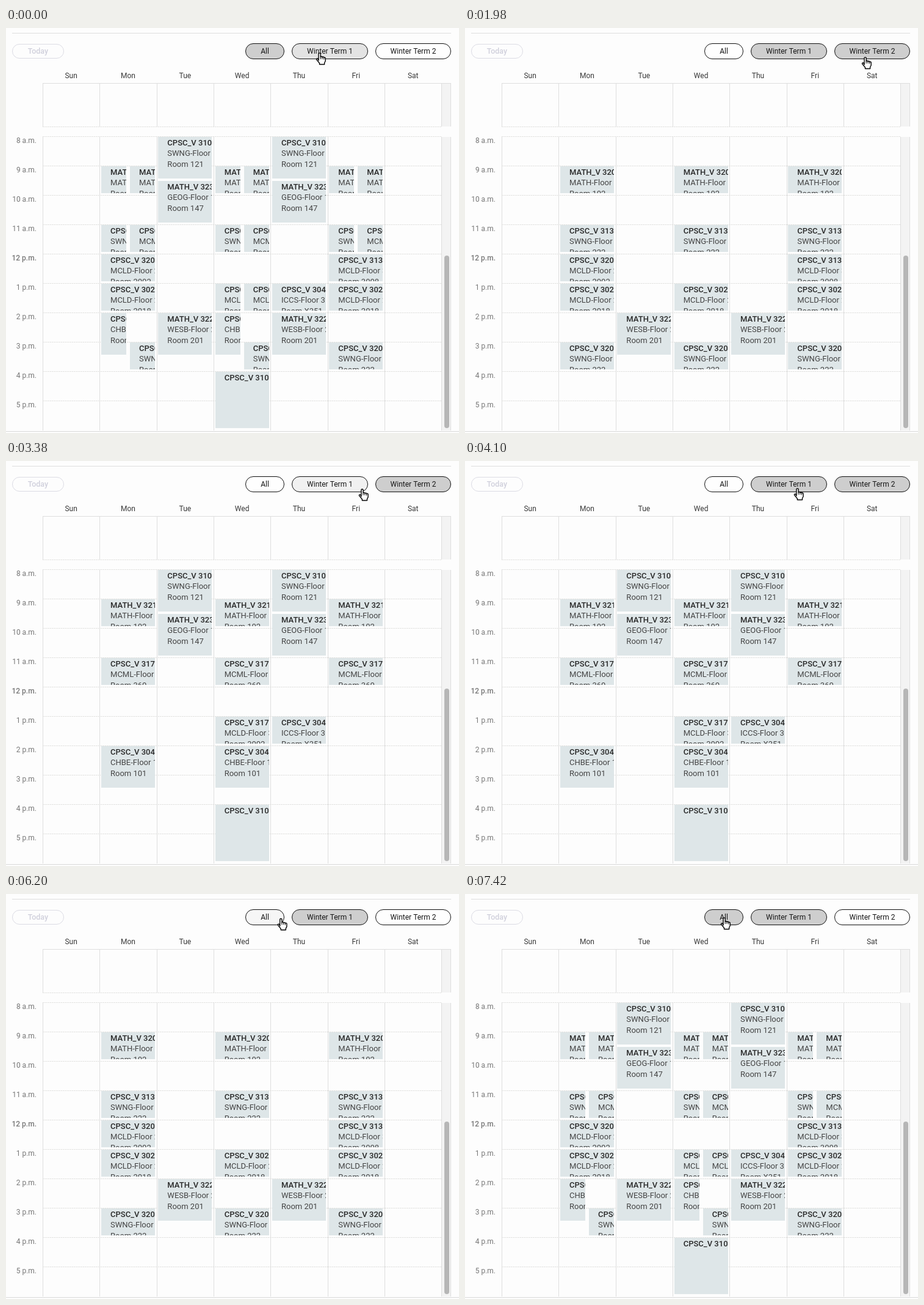
Animation of 742 by 662 pixels, one loop 7520 ms. Source, as an HTML page with a canvas:

```html
<!DOCTYPE html>
<html lang="en">
<head>
<meta charset="utf-8">
<title>Timetable</title>
<style>
html, body { margin: 0; width: 100%; height: 100%; overflow: hidden; background: #fdfdfd; }
canvas { display: block; }
</style>
</head>
<body>
<canvas id="stage" width="742" height="662"></canvas>
<script>
const ctx = document.getElementById('stage').getContext('2d');
const LOOP = 7520, COL = 280 / 3, HOUR = 48, LEFT = 60, TOP = 178;
const PAPER = '#fdfdfd', RULE = '#dededc', EDGE = '#dedede';

// term, days (0 = Sun), start, hours, title, place, room
const events = [
  [1, [1, 3, 5], 9, 1, 'MATH_V 320', 'MATH-Floor 1', 'Room 102'],
  [1, [1, 3, 5], 11, 1, 'CPSC_V 313', 'SWNG-Floor 2', 'Room 222'],
  [1, [1], 12, 1, 'CPSC_V 320', 'MCLD-Floor 2', 'Room 2002'],
  [1, [5], 12, 1, 'CPSC_V 313', 'MCLD-Floor 3', 'Room 3008'],
  [1, [1, 3, 5], 13, 1, 'CPSC_V 302', 'MCLD-Floor 2', 'Room 2018'],
  [1, [2, 4], 14, 1.5, 'MATH_V 322', 'WESB-Floor 2', 'Room 201'],
  [1, [1, 3, 5], 15, 1, 'CPSC_V 320', 'SWNG-Floor 2', 'Room 222'],
  [2, [2, 4], 8, 1.5, 'CPSC_V 310', 'SWNG-Floor 1', 'Room 121'],
  [2, [1, 3, 5], 9, 1, 'MATH_V 321', 'MATH-Floor 1', 'Room 102'],
  [2, [2, 4], 9.5, 1.5, 'MATH_V 323', 'GEOG-Floor 1', 'Room 147'],
  [2, [1, 3, 5], 11, 1, 'CPSC_V 317', 'MCML-Floor 3', 'Room 360'],
  [2, [3], 13, 1, 'CPSC_V 317', 'MCLD-Floor 3', 'Room 3002'],
  [2, [4], 13, 1, 'CPSC_V 304', 'ICCS-Floor 3', 'Room X351'],
  [2, [1, 3], 14, 1.5, 'CPSC_V 304', 'CHBE-Floor 1', 'Room 101'],
  [2, [3], 16, 2, 'CPSC_V 310', '', '']
].flatMap(([term, days, start, hours, ...lines]) =>
  days.map(day => ({ term, day, start, end: start + hours, lines })));

// Clicks: time, term shown (0 = both)
const clicks = [[0, 0], [1140, 1], [2400, 2], [4900, 1], [7400, 0]];

// Keys: time, then values. A button turns grey when hovered or selected.
const buttons = [
  { x: 392, w: 64, label: 'All',
    keys: [[0, 1], [1139, 1], [1140, 0], [6150, 0], [6450, 1]] },
  { x: 468, w: 125, label: 'Winter Term 1',
    keys: [[0, .57], [160, 1], [2400, 1], [2650, 0], [3300, 0], [3600, 1]] },
  { x: 605, w: 124, label: 'Winter Term 2',
    keys: [[0, 0], [1139, 0], [1140, .85], [1220, 1], [4900, 1], [5150, 0]] }
];
const pointer = [[0, 516, 50], [160, 518, 50], [1139, 518, 50], [1140, 651, 57], [1400, 658, 57],
  [2900, 658, 57], [3700, 547, 54], [5550, 546, 54], [6480, 427, 48]];

const hand = new Path2D('M-4 3V-7.5a1.6 1.6 0 0 1 3.2 0V-2.5a1.5 1.5 0 0 1 2.8 0v.6' +
  'a1.4 1.4 0 0 1 2.7 0v.8a1.3 1.3 0 0 1 2.5.3V4L5.6 7V9.5H-2.5V7.5L-7.4 1.6Q-7.6-.6-5.4 0Z');
const creases = new Path2D('M-.8-2.5V1M2-2V1M4.7-1V1.5');

const linear = p => p;
const smooth = p => p * p * (3 - 2 * p);

function sample(keys, t, ease) {
  const i = keys.findIndex(k => k[0] > t);
  if (i < 0) return keys.at(-1).slice(1);
  const a = keys[i - 1], b = keys[i], p = ease((t - a[0]) / (b[0] - a[0]));
  return a.slice(1).map((v, j) => v + (b[j + 1] - v) * p);
}

function rect(x, y, w, h, color) {
  ctx.fillStyle = color;
  ctx.fillRect(x, y, w, h);
}

function text(str, x, y, color, size = 12, weight = 400, align = 'center') {
  ctx.font = `${weight} ${size}px Roboto, sans-serif`;
  ctx.textAlign = align;
  ctx.fillStyle = color;
  ctx.fillText(str, x, y);
}

function pill(x, y, w, h, fill, stroke) {
  ctx.beginPath();
  ctx.roundRect(x + .5, y + .5, w - 1, h - 1, (h - 1) / 2);
  ctx.fillStyle = fill;
  ctx.fill();
  ctx.strokeStyle = stroke;
  ctx.lineWidth = 1;
  ctx.stroke();
}

function dashes(y) {
  ctx.strokeStyle = RULE;
  ctx.lineWidth = 1;
  ctx.setLineDash([2, 1]);
  ctx.beginPath();
  ctx.moveTo(LEFT, y + .5);
  ctx.lineTo(714, y + .5);
  ctx.stroke();
  ctx.setLineDash([]);
}

function drawGrid() {
  rect(0, 0, 742, 662, PAPER);
  rect(10, 8, 719, 1, EDGE);
  pill(10, 26, 85, 24, PAPER, '#dcdce4');
  text('Today', 52.5, 42, '#d0d0dc', 12.5, 500);

  for (const [y, h] of [[90, 71], [TOP, 480]]) {
    rect(714, y, 14, h, '#f3f3f3');
    for (let c = 0; c < 8; c++) rect(Math.round(LEFT + c * COL), y, 1, h, EDGE);
    rect(728, y, 1, h, EDGE);
  }
  rect(LEFT, 90, 669, 1, EDGE);
  dashes(161);
  ['Sun', 'Mon', 'Tue', 'Wed', 'Thu', 'Fri', 'Sat'].forEach((d, c) =>
    text(d, LEFT + (c + .5) * COL, 82, '#383838'));
  for (let h = 8; h < 18; h++) {
    const y = TOP + (h - 8) * HOUR - 1;
    dashes(y);
    text(`${h > 12 ? h - 12 : h} ${h < 12 ? 'a' : 'p'}.m.`, 50, y + 11,
      '#777', 12, h === 12 ? 500 : 400, 'right');
  }
  rect(0, 659, 742, 1, '#d8d8d8');
  ctx.beginPath();
  ctx.roundRect(718, 372, 8, 282, 4);
  ctx.fillStyle = '#b6b6b6';
  ctx.fill();
}

function drawEvents(term) {
  const shown = events.filter(e => !term || e.term === term);
  for (const e of shown) {
    const rival = shown.find(o => o !== e && o.day === e.day && o.start < e.end && e.start < o.end);
    const second = rival && (rival.start - e.start || rival.term - e.term) < 0;
    const x = LEFT + e.day * COL + 2.7 + (second ? 47 : 0), w = rival ? 41 : 87.5;
    const y = TOP + (e.start - 8) * HOUR - .5, h = (e.end - e.start) * HOUR - 4.5;
    ctx.save();
    ctx.beginPath();
    ctx.rect(Math.round(x), Math.round(y), Math.round(w), Math.round(h));
    ctx.clip();
    rect(x - 1, y - 1, w + 2, h + 2, '#dee6e8');
    e.lines.forEach((line, i) =>
      text(line, x + 15, y + [14.5, 31.5, 49.5][i], i ? '#444' : '#282828', 13, i ? 400 : 500, 'left'));
    ctx.restore();
  }
}

function drawPointer(x, y) {
  ctx.save();
  ctx.translate(x, y);
  ctx.lineJoin = 'round';
  ctx.lineWidth = 1.4;
  ctx.strokeStyle = '#000';
  ctx.fillStyle = '#fff';
  ctx.fill(hand);
  ctx.stroke(hand);
  ctx.lineWidth = 1;
  ctx.stroke(creases);
  ctx.restore();
}

function frame(now) {
  const t = now % LOOP;
  drawGrid();
  drawEvents(clicks.findLast(k => k[0] <= t)[1]);
  for (const b of buttons) {
    const shade = Math.round(254 - 48 * sample(b.keys, t, linear)[0]);
    pill(b.x, 25, b.w, 26, `rgb(${shade}, ${shade}, ${shade})`, '#111');
    text(b.label, b.x + b.w / 2, 42, '#161616');
  }
  drawPointer(...sample(pointer, t, smooth));
  requestAnimationFrame(frame);
}
requestAnimationFrame(frame);
</script>
</body>
</html>
```
